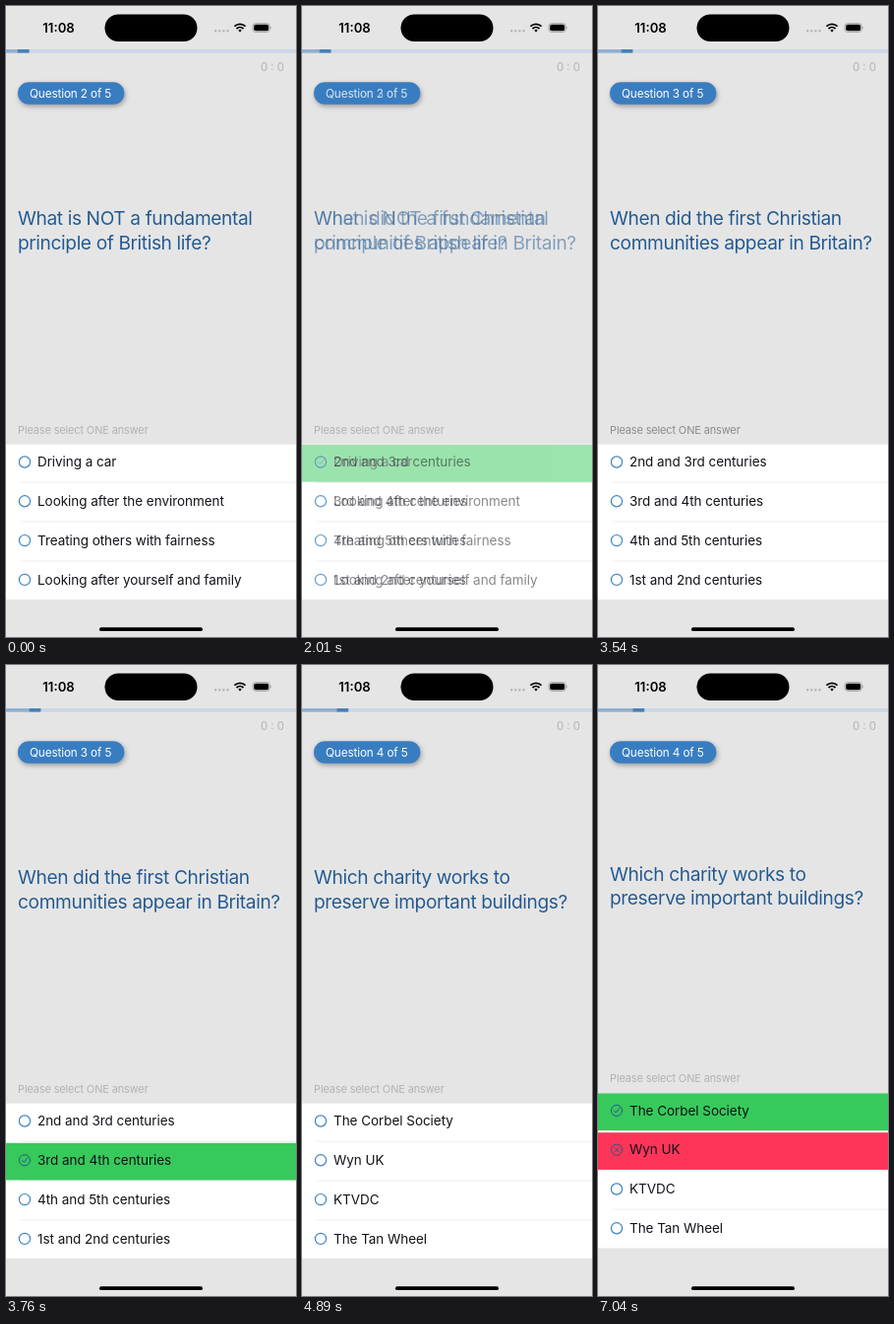
An HTML page for the animation above (8 s loop, 295 by 640 pixels).

```html
<!DOCTYPE html>
<html lang="en">
<head>
<meta charset="utf-8">
<title>Quiz</title>
<style>
  html, body { margin: 0; height: 100%; overflow: hidden; background: #e5e5e5; }
  svg { display: block; width: 100%; height: 100%; font-family: Inter, Roboto, sans-serif; font-optical-sizing: none; }
  .time { font-size: 13.2px; font-weight: 600; }
  .score { font-size: 11.4px; fill: #b2b2b2; text-anchor: end; }
  .badge { font-size: 11.75px; letter-spacing: -.13px; fill: #fff; }
  .title { font-size: 19.2px; letter-spacing: -.41px; fill: #215890; filter: drop-shadow(.8px .8px 0 #fff); }
  .hint { font-size: 11px; letter-spacing: -.15px; }
  .answer { font-size: 13.5px; letter-spacing: -.05px; fill: #111318; }
  .ring { fill: none; stroke: #3c83c0; stroke-width: 1.2; }
  .mark { fill: none; stroke: #24598a; stroke-width: 1; stroke-linecap: round; stroke-linejoin: round; }
  .pill { fill: #397dc1; filter: drop-shadow(1px 2px 2.4px #0005); }
</style>
</head>
<body>
<svg viewBox="0 0 295 640" preserveAspectRatio="none">
  <rect width="295" height="640" fill="#e5e5e5"/>
  <text class="time" x="37.3" y="26.6">11:08</text>
  <rect x="100.5" y="8.5" width="94" height="27.5" rx="13.75"/>
  <path d="M213.2 25.3h13" fill="none" stroke="#b3b3b3" stroke-width="2.4" stroke-linecap="round" stroke-dasharray="0 4.1"/>
  <g fill="none" stroke="#000" stroke-width="1.8">
    <path d="M232.4 20.6a8 8 0 0 1 11.2 0M234.5 23a5 5 0 0 1 7 0"/>
    <path d="M236.3 24.7a2.4 2.4 0 0 1 3.4 0L238 26.5z" fill="#000" stroke="none"/>
  </g>
  <rect x="251" y="17.6" width="17.4" height="8.8" rx="2.8" fill="none" stroke="#999" stroke-width=".8"/>
  <rect x="252.2" y="18.8" width="15" height="6.4" rx="1.8"/>
  <path d="M269.4 20.5q1.6 1.5 0 3z" fill="#999"/>

  <rect y="44" width="295" height="3.6" fill="#cad7e6"/>
  <rect id="done" y="44" height="3.6" fill="#8fb0d1"/>
  <rect id="now" y="44" width="11.8" height="3.6" fill="#4581bb"/>
  <text class="score" x="283" y="66">0 : 0</text>
  <rect class="pill" x="12" y="77.3" width="108.4" height="22.4" rx="11.2"/>
  <g id="heads"></g>
  <g id="list">
    <text id="hint" class="hint" x="12" y="433.5">Please select ONE answer</text>
    <rect y="444.7" width="295" height="157.3" fill="#fff"/>
    <path d="M15 483.2h280M15 523h280M15 562.8h280" stroke="#e8e8e8" stroke-width=".8"/>
    <g id="rows"></g>
  </g>
  <rect x="95" y="630.3" width="105" height="3.7" rx="1.85"/>
</svg>
<script>
const LOOP = 8000, STEP = 110, PITCH = 39.8;
const GREEN = '#38c95c', RED = '#ff3459';
const CHECK = 'M16.4 462.7l1.9 2 3.5-4.4', CROSS = 'M17 460.5l4 4M21 460.5l-4 4';

// begin: when the question fades in; pick: when its answer is tapped
const quiz = [
  { no: 2, begin: -1000, pick: 910, right: 0,
    title: ['What is NOT a fundamental', 'principle of British life?'],
    answers: ['Driving a car', 'Looking after the environment', 'Treating others with fairness', 'Looking after yourself and family'] },
  { no: 3, begin: 1900, pick: 3540, right: 1,
    title: ['When did the first Christian', 'communities appear in Britain?'],
    answers: ['2nd and 3rd centuries', '3rd and 4th centuries', '4th and 5th centuries', '1st and 2nd centuries'] },
  { no: 4, begin: 4580, pick: 6820, right: 0, wrong: 1,
    title: ['Which charity works to', 'preserve important buildings?'],
    answers: ['The Corbel Society', 'Wyn UK', 'KTVDC', 'The Tan Wheel'] }
];

const $ = id => document.getElementById(id);
const clamp = v => Math.min(1, Math.max(0, v));

function add(parent, name, attrs, text = '') {
  const el = document.createElementNS('http://www.w3.org/2000/svg', name);
  for (const key in attrs) el.setAttribute(key, attrs[key]);
  el.textContent = text;
  return parent.appendChild(el);
}

for (const q of quiz) {
  q.head = add($('heads'), 'g', {});
  add(q.head, 'text', { class: 'badge', x: 24, y: 92.7 }, `Question ${q.no} of 5`);
  q.titleBox = add(q.head, 'g', {});
  q.title.forEach((line, i) =>
    add(q.titleBox, 'text', { class: 'title', x: 12, y: 222.3 + i * 24.8 }, line));

  q.body = add($('rows'), 'g', {});
  q.marks = [];
  q.answers.forEach((answer, i) => {
    const row = add(q.body, 'g', { transform: `translate(0 ${i * PITCH})` });
    add(row, 'circle', { class: 'ring', cx: 19, cy: 462.5, r: 5.6 });
    if (i === q.right || i === q.wrong) {
      const mark = add(row, 'g', {});
      add(mark, 'rect', { y: 445, width: 295, height: 37.7, fill: i === q.right ? GREEN : RED });
      add(mark, 'circle', { class: 'mark', cx: 19, cy: 462.5, r: 5.6 });
      add(mark, 'path', { class: 'mark', d: i === q.right ? CHECK : CROSS });
      q.marks.push(mark);
    }
    add(row, 'text', { class: 'answer', x: 32, y: 467.3 }, answer);
  });
}

// Cross-fade in four even steps ending 310 ms after it begins
const fadeIn = (q, t) => !q ? 0 : clamp((Math.floor((t - q.begin) / 103) + 1) / 4);

function draw(t) {
  let segment = 1, flash = 0;
  quiz.forEach((q, i) => {
    const shown = fadeIn(q, t), gone = fadeIn(quiz[i + 1], t);
    const alpha = Math.min(shown, 1 - gone);
    for (const el of [q.head, q.body]) el.style.opacity = alpha;
    const since = t - q.pick;
    const picked = clamp(Math.floor(since / STEP) / 2);
    for (const mark of q.marks) mark.style.opacity = picked;
    if (since >= 0) flash = 1 - picked;
    if (i) segment += shown;
  });

  const last = quiz[2], lifted = t >= last.pick;
  last.titleBox.setAttribute('transform', `translate(0 ${lifted ? -3.6 : 0})`);
  $('list').setAttribute('transform', `translate(0 ${lifted ? -10.6 : 0})`);
  const grey = 178 - 40 * flash;
  $('hint').setAttribute('fill', `rgb(${grey},${grey},${grey})`);
  $('done').setAttribute('width', segment * 11.8);
  $('now').setAttribute('x', segment * 11.8);
}

function tick() {
  draw(performance.now() % LOOP);
  requestAnimationFrame(tick);
}
tick();
</script>
</body>
</html>
```
